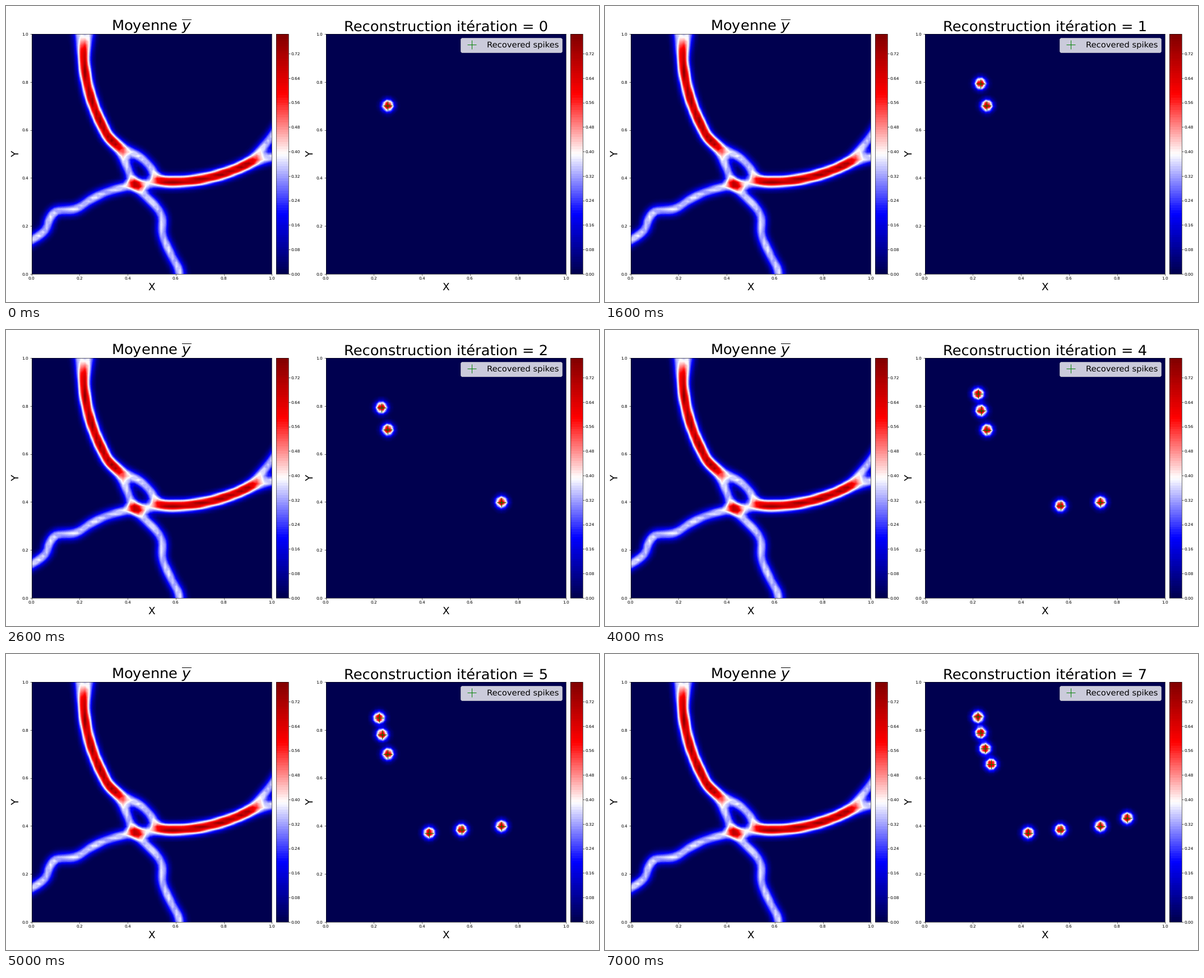
These frames come from a looping animation (1058x529 px, 8 s). A matplotlib script:

```python
import numpy as np
import matplotlib.pyplot as plt
from matplotlib.animation import FuncAnimation

plt.rcParams["text.hinting"] = "none"

W, H = 1058, 529
SIDE, BOTTOM = 428.8, 50.1
LEVELS = np.arange(99) * 0.008
SPIKE_AMP, SPIKE_SIGMA = 0.77, 0.0158
TUBE_AMP, TUBE_SIGMA = 0.372, 0.0165

axis = np.linspace(0, 1, 64)
X, Y = np.meshgrid(axis, axis)


def trunk(y, fork=0):
    """Upper vessel; its two strands part by `fork` near the top edge."""
    x = 0.214 + 0.82 * np.maximum(0.983 - y, 0) ** 2.3
    return x + fork * np.maximum(y - 0.88, 0) / 0.12


def arm(x, fork=0):
    """Right vessel; its two strands part by `fork` near the right edge."""
    y = 0.3841 + 0.77 * (x - 0.589) ** 2
    return y + fork * (np.maximum(x - 0.88, 0) / 0.12) ** 1.4


def trunk_points(fork):
    return [(trunk(y, fork), y) for y in np.linspace(1.06, 0.57, 12)]


def arm_points(fork):
    return [(x, arm(x, fork)) for x in np.linspace(0.56, 1.04, 12)]


LOOP = [(.375, .530), (.415, .508), (.458, .483), (.495, .445), (.520, .405)]
LEG = [(.375, .497), (.432, .372), (.515, .285), (.543, .235),
       (.545, .165), (.580, .082), (.612, .020), (.620, -.04)]
TAIL = [(-.05, .110), (.050, .175), (.075, .228), (.105, .262),
        (.185, .272), (.250, .312), (.325, .346), (.430, .372), (.500, .378)]

FILAMENTS = [trunk_points(-0.016) + LOOP + arm_points(-0.027),
             trunk_points(0.026) + LEG,
             TAIL + arm_points(0.060)]

# Spikes: heights along the trunk, then points added along the low branch
PAIR = [0.7017, 0.7938]
TRIO = [0.851, 0.781, 0.7005]
QUAD = list(np.linspace(0.8545, 0.6574, 4))
HEIGHTS = [PAIR[:1], PAIR, PAIR, PAIR, TRIO, TRIO, QUAD, QUAD]
LOW = [(.7313, arm(.7313)), (.5646, arm(.5646)), (.4305, .3717),
       (.8421, arm(.8421))]


def spikes(i):
    """One more spike at every iteration."""
    high = [(trunk(y), y) for y in HEIGHTS[i]]
    return high + LOW[:i + 1 - len(high)]


def smooth(points, n=24):
    """Catmull-Rom curve through the control points."""
    p = np.array(points)
    p = np.vstack([2 * p[0] - p[1], p, 2 * p[-1] - p[-2]])
    t = np.linspace(0, 1, n, endpoint=False)[:, None]
    return np.vstack([0.5 * (2 * b + (c - a) * t
                             + (2 * a - 5 * b + 4 * c - d) * t ** 2
                             + (3 * b - a - 3 * c + d) * t ** 3)
                      for a, b, c, d in zip(p, p[1:], p[2:], p[3:])])


def tube(points, phase):
    """Gaussian ridge along a curve, with a slowly varying height."""
    c = smooth(points)
    d2 = (X[..., None] - c[:, 0]) ** 2 + (Y[..., None] - c[:, 1]) ** 2
    steps = np.hypot(*np.diff(c, axis=0).T)
    s = np.concatenate([[0], np.cumsum(steps)])[d2.argmin(axis=-1)]
    amp = TUBE_AMP + 0.018 * np.sin(60 * s + phase)
    return amp * np.exp(-d2.min(axis=-1) / (2 * TUBE_SIGMA ** 2))


def spike_field(points):
    z = np.zeros_like(X)
    for x, y in points:
        d2 = (X - x) ** 2 + (Y - y) ** 2
        z += SPIKE_AMP * np.exp(-d2 / (2 * SPIKE_SIGMA ** 2))
    return z


def fill(ax, z):
    return ax.contourf(X, Y, np.minimum(z, 0.783), LEVELS, cmap="seismic")


def panel(left, z):
    """Square plot with its colour bar."""
    ax = fig.add_axes([left / W, BOTTOM / H, SIDE / W, SIDE / H])
    cax = fig.add_axes([(left + SIDE + 7.95) / W, BOTTOM / H,
                        0.05 * SIDE / W, SIDE / H])
    filled = fill(ax, z)
    fig.colorbar(filled, cax=cax)
    ax.set(xlim=(0, 1), ylim=(0, 1))
    ax.set_xlabel("X", fontsize=25, labelpad=4.5)
    ax.set_ylabel("Y", fontsize=25, labelpad=3)
    return ax, filled


fig = plt.figure(figsize=(20, 10), dpi=52.9)

mean = sum(tube(points, 1.3 * k) for k, points in enumerate(FILAMENTS))
ax_mean, _ = panel(45.5, mean)
ax_mean.set_title(r"Moyenne $\overline{y}$", fontsize=35, y=1, pad=8.3)

ax_rec, layer = panel(570.5, spike_field(spikes(0)))
title = ax_rec.set_title("", fontsize=35, y=1, pad=7)
marks, = ax_rec.plot([], [], "g+", ms=21, mew=1.3, label="Recovered spikes")
ax_rec.legend(loc="upper right", fontsize=20)


def update(i):
    global layer
    points = spikes(i)
    layer.remove()
    layer = fill(ax_rec, spike_field(points))
    marks.set_data(*zip(*points))
    title.set_text(f"Reconstruction itération = {i}")
    return layer, marks, title


anim = FuncAnimation(fig, update, frames=len(HEIGHTS), interval=1000,
                     repeat=True, repeat_delay=0, blit=False)
plt.show()
```
